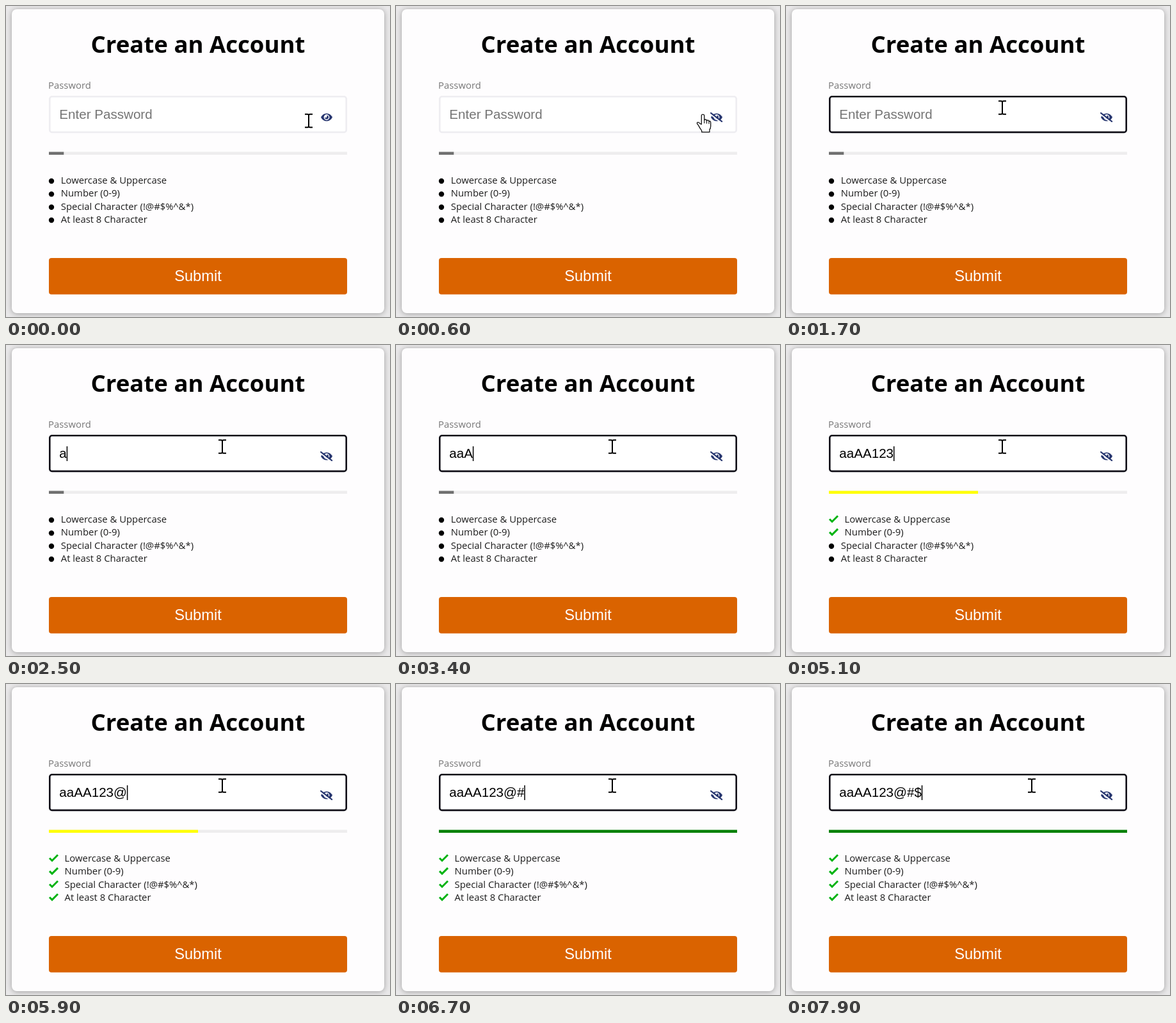
Write an HTML page that moves like this. It is 600 px wide and 485 px high and loops after 8000 ms.

```html
<!DOCTYPE html>
<html lang="en">
<head>
<meta charset="utf-8">
<title>Create an Account</title>
<style>
  html, body { margin: 0; width: 100%; height: 100%; overflow: hidden; background: #e9e8e9; }
  svg { display: block; position: absolute; left: 0; top: 0; }
  .card { position: absolute; left: 9px; top: 5px; width: 582px; height: 474px; border-radius: 8px;
    background: #fefdfe; box-shadow: 0 1px 9px rgba(0, 0, 0, .33); }
  text { font-family: "Open Sans", sans-serif; font-size: 14.87px; fill: #1c1c1c; white-space: pre; }
  .title { font-size: 36.6px; font-weight: 700; fill: #000; }
  .label { fill: #777; }
  .field { font-family: Arial, "Liberation Sans", sans-serif; font-size: 20.6px; fill: #000; }
  .hint { fill: #757575; }
  .submit { font-family: Arial, "Liberation Sans", sans-serif; font-size: 23.7px; fill: #fff; }
</style>
</head>
<body>
<div class="card"></div>
<svg width="600" height="485" viewBox="0 0 600 485">
  <text class="title" x="300" y="73" text-anchor="middle">Create an Account</text>
  <text class="label" x="66" y="128.7">Password</text>

  <rect id="box" x="68.3" y="141.3" width="463.4" height="55.6" rx="3.5" fill="#fff" stroke-width="2.6"/>
  <text id="hint" class="field hint" x="83.3" y="176.4">Enter Password</text>
  <text id="value" class="field" x="83.3" y="176.4"></text>
  <rect id="caret" y="158" width="1.5" height="23"/>

  <g transform="translate(501 173.5)">
    <path d="M-9 0C-7 -4 -3.8 -6 0 -6S7 -4 9 0C7 4 3.8 6 0 6S-7 4 -9 0Z" fill="#27366f"/>
    <circle r="4.4" fill="#fff"/>
    <path d="M-3 0A3 3 0 1 0 0 -3A1.7 1.7 0 0 1 -3 0Z" fill="#27366f"/>
    <g id="slash" fill="none" stroke-linecap="round">
      <path d="M-9 -4.3L6.5 8" stroke="#fff" stroke-width="2"/>
      <path d="M-9 -6.6L8.2 6.6" stroke="#27366f" stroke-width="2"/>
    </g>
  </g>

  <rect x="67" y="227.5" width="466" height="4.5" fill="#eeedee"/>
  <rect id="bar" x="67" y="227.5" height="4.5"/>
  <g id="rules"></g>

  <rect x="67" y="393" width="466" height="56.7" rx="4" fill="#da6300"/>
  <text class="submit" x="300" y="428.6" text-anchor="middle">Submit</text>

  <g id="beam" fill="none">
    <path d="M-6 -10.2H-2Q0 -10.2 0 -8.5Q0 -10.2 2 -10.2H6M0 -9V9M-6 10.2H-2Q0 10.2 0 8.5Q0 10.2 2 10.2H6"
      stroke="#000" stroke-width="2"/>
  </g>
  <g id="hand">
    <path d="M-2.2 16V2.5Q-2.2 .6 0 .6T2.2 2.5V9.5Q2.8 8.2 4.3 8.5T6 10.6Q6.8 9.2 8.2 9.7T9.5 11.8Q10.2 10.7 11.2 11.2T12.2 13.5V19Q12.2 22 10.4 24.5V28.2H-1.8V25.8Q-4.5 22.5 -6 19.4Q-7.2 16.8 -8.8 15.2Q-9.7 13.4 -8 12.9Q-6 12.5 -4.2 15.2Z"
      fill="#fff" stroke="#111" stroke-width="1.3" stroke-linejoin="round"/>
    <path d="M2.2 9V14.5M6 10.5V15M9.5 12V15.5" fill="none" stroke="#111" stroke-width="1.1"/>
  </g>
</svg>
<script>
const LOOP = 8000, STEP = 100, FADE = 300, BLINK = 500;
const FOCUS = 1200, REVEAL = 500;
const $ = id => document.getElementById(id);
const show = (el, on) => el.setAttribute('visibility', on ? 'visible' : 'hidden');
const mix = (a, b, k) => a + (b - a) * k;
const ease = k => k * k * (3 - 2 * k);

const KEYS = [['a', 2500], ['a', 2800], ['A', 3400], ['A', 3700], ['1', 4400],
  ['2', 4700], ['3', 5000], ['@', 5800], ['#', 6400], ['$', 6800]];

const RULES = [['Lowercase & Uppercase', 3500], ['Number (0-9)', 4500],
  ['Special Character (!@#$%^&*)', 5900], ['At least 8 Character', 5900]];

// start time, share of full width, colour
const LEVELS = [[-FADE, .05, [112, 112, 112]], [3500, .25, [255, 0, 0]],
  [4500, .5, [255, 255, 0]], [5900, 1, [0, 128, 0]]];

// time, x, y
const PATH = [[0, 473, 179], [200, 490, 173], [450, 490, 173], [600, 479.5, 168.5],
  [1000, 338, 158.5], [7500, 338, 158.5], [7900, 384, 158.5]];

const rows = RULES.map(([label, at], i) => {
  const y = i * 20.35;
  $('rules').insertAdjacentHTML('beforeend',
    `<circle cx="71" cy="${273 + y}" r="4.2"/>
     <path d="M68 ${y + 271.5}l4 4l9 -9" fill="none" stroke="#00b312" stroke-width="3"/>
     <text y="${y + 277}"></text>`);
  const [text, tick, dot] = [...$('rules').children].slice(-3).reverse();
  text.textContent = label;
  return { text, tick, dot, at };
});

function drawBar(t) {
  const i = LEVELS.findLastIndex(l => t >= l[0]);
  const to = LEVELS[i], from = LEVELS[Math.max(0, i - 1)];
  const k = ease(Math.min(1, (t - to[0]) / FADE));
  $('bar').setAttribute('width', 466 * mix(from[1], to[1], k));
  $('bar').setAttribute('fill', `rgb(${to[2].map((c, j) => Math.round(mix(from[2][j], c, k)))})`);
}

function drawField(t) {
  const typed = KEYS.filter(k => t >= k[1]);
  const since = typed.length ? typed[typed.length - 1][1] : FOCUS;
  $('value').textContent = typed.map(k => k[0]).join('');
  show($('hint'), !typed.length);
  $('box').setAttribute('stroke', t >= FOCUS ? '#111018' : '#eeedf1');
  $('caret').setAttribute('x', 83.2 + (typed.length ? $('value').getComputedTextLength() : 0));
  show($('caret'), t >= FOCUS && (t - since) % (2 * BLINK) < BLINK);
}

function drawPointer(t) {
  const i = Math.min(PATH.findLastIndex(p => t >= p[0]), PATH.length - 2);
  const [a, b] = [PATH[i], PATH[i + 1]];
  const k = ease(Math.min(1, (t - a[0]) / (b[0] - a[0])));
  const x = mix(a[1], b[1], k), y = mix(a[2], b[2], k);
  const overEye = x > 476;
  for (const id of ['beam', 'hand']) {
    $(id).setAttribute('transform', `translate(${x} ${y})`);
    show($(id), (id === 'hand') === overEye);
  }
}

function draw(now) {
  const t = Math.floor(now % LOOP / STEP) * STEP;
  show($('slash'), t >= REVEAL);
  drawField(t);
  drawBar(t);
  for (const r of rows) {
    const done = t >= r.at;
    show(r.tick, done);
    show(r.dot, !done);
    r.text.setAttribute('x', done ? 91.6 : 85.8);
  }
  drawPointer(t);
}

let start;
function frame(now) {
  start ??= now;
  draw(Math.max(0, now - start));
  requestAnimationFrame(frame);
}
draw(0);
requestAnimationFrame(frame);
</script>
</body>
</html>
```
